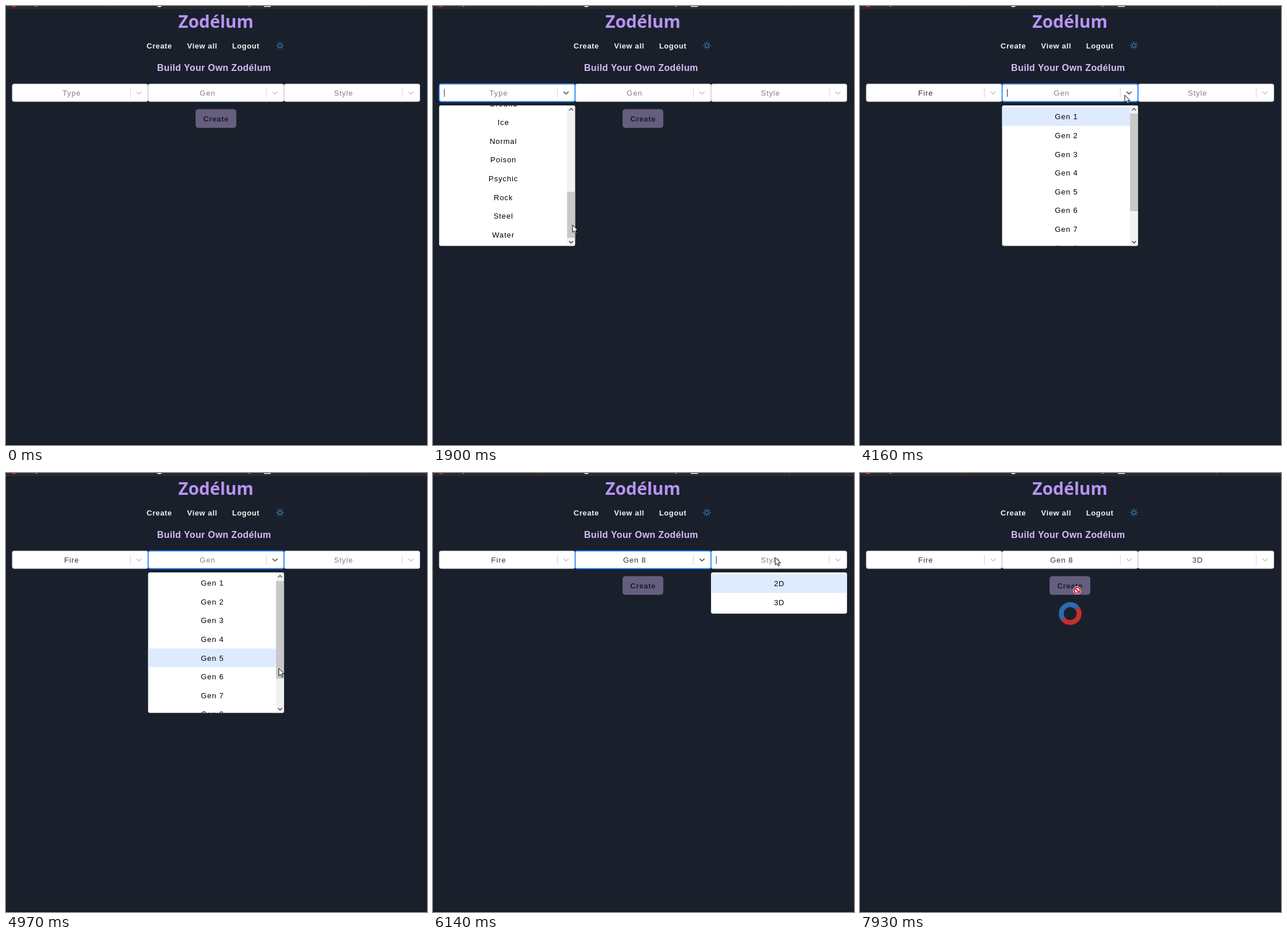
An HTML page with a canvas for the animation above (8000 ms loop, 733 by 764 pixels).

```html
<!DOCTYPE html>
<html lang="en">
<head>
<meta charset="utf-8">
<title>Build Your Own Zodélum</title>
<style>
  html, body { margin: 0; width: 100%; height: 100%; overflow: hidden; background: #1a202b; }
  canvas { display: block; }
</style>
</head>
<body>
<canvas id="stage" width="733" height="764"></canvas>
<script>
const ctx = document.getElementById('stage').getContext('2d');
const LOOP = 8000, STEP = 90;
const SANS = '"Liberation Sans", Arial, sans-serif';
const DARK = '#1a202b', FOCUS = '#2684ff';

// Select and menu metrics
const WIDTH = 236.7, TOP = 135.5, HEIGHT = 31, RADIUS = 3.3;
const MENU_TOP = 173, MENU_MAX = 244.5, PAD = 3.26, ROW = 32.6, BAR = 13.9;

// All times below are counted in steps.
const selects = [
  { x: 10.7, label: 'Type', value: 'Fire', open: 8, pick: 40, focus: [8, 45], caretEnd: 45,
    options: ('Bug Dark Dragon Electric Fairy Fighting Fire Flying Ghost Grass Ground ' +
      'Ice Normal Poison Psychic Rock Steel Water').split(' '),
    thumb: 80, drag: { from: 17, to: 32, y: 228 } },
  { x: 247.4, label: 'Gen', value: 'Gen 8', open: 45, pick: 63, focus: [45, 69], caretEnd: 68,
    options: Array.from({ length: 9 }, (_, i) => `Gen ${i + 1}`),
    thumb: 170, drag: { from: 55, to: 57, y: 339 } },
  { x: 484.1, label: 'Style', value: '3D', open: 68, pick: 73, focus: [69, 81], caretEnd: 81,
    options: ['2D', '3D'] },
];
const HOVER = 78, SUBMIT = 81;

const pointerPath = [                       // step, x, y
  [1, 110, 314], [6, 225, 148], [8, 225, 148], [15, 243, 228], [17, 243, 228],
  [21, 243, 381], [22, 246, 384], [23, 246, 384], [32, 249, 276], [35, 249, 276],
  [37, 130, 264], [40, 130, 264], [45, 461, 155], [48, 461, 155], [52, 456, 255],
  [54, 466, 325], [55, 475, 340], [57, 473, 386], [58, 455, 372], [60, 430, 365],
  [62, 430, 365], [66, 596, 147], [68, 596, 147], [72, 602, 222], [73, 602, 222],
  [77, 368, 168], [78, 370, 195], [79, 372, 207], [81, 373, 206], [83, 378, 204],
];

const clamp = (v, lo, hi) => Math.min(hi, Math.max(lo, v));
const within = (v, a, b) => v >= a && v < b;

function pointerAt(step) {
  const next = pointerPath.findIndex(p => p[0] >= step);
  if (next <= 0) return (next ? pointerPath.at(-1) : pointerPath[0]).slice(1);
  const a = pointerPath[next - 1], b = pointerPath[next];
  const u = (step - a[0]) / (b[0] - a[0]);
  return [1, 2].map(i => a[i] + (b[i] - a[i]) * u);
}

// Share of the scroll range, 0 to 1, taken from the dragged thumb
function scrollShare({ drag, thumb }, step) {
  if (!drag || step < drag.from) return 0;
  const travel = MENU_MAX - 2 * BAR - thumb;
  return clamp((pointerAt(Math.min(step, drag.to))[1] - drag.y) / travel, 0, 1);
}

function menuLayout(sel, step) {
  const full = sel.options.length * ROW + 2 * PAD;
  const height = Math.min(full, MENU_MAX);
  const share = scrollShare(sel, step);
  return { height, share, listWidth: WIDTH - (sel.drag ? BAR : 0), offset: share * (full - height) };
}

// The last option the pointer passed over stays highlighted
function highlighted(sel, step) {
  let row = 0;
  for (let s = sel.open; s <= step; s++) {
    const [x, y] = pointerAt(s), m = menuLayout(sel, s);
    if (within(x, sel.x, sel.x + m.listWidth) && within(y, MENU_TOP + PAD, MENU_TOP + m.height))
      row = clamp(Math.floor((y - MENU_TOP - PAD + m.offset) / ROW), 0, sel.options.length - 1);
  }
  return row;
}

function box(x, y, w, h, fill, radius = 0) {
  ctx.fillStyle = fill;
  ctx.beginPath();
  ctx.roundRect(x, y, w, h, radius);
  ctx.fill();
}

function line(points, color, width, close) {
  ctx.beginPath();
  points.forEach(p => ctx.lineTo(...p));
  if (close) ctx.closePath();
  ctx.strokeStyle = color;
  ctx.lineWidth = width;
  ctx.stroke();
}

function disc(x, y, r, fill) {
  ctx.beginPath();
  ctx.arc(x, y, r, 0, 7);
  ctx.fillStyle = fill;
  ctx.fill();
}

function arc(x, y, r, from, to, color, width) {
  ctx.beginPath();
  ctx.arc(x, y, r, from, to);
  ctx.strokeStyle = color;
  ctx.lineWidth = width;
  ctx.stroke();
}

function text(str, x, y, color, { font = `13.1px ${SANS}`, spacing = 0.9, align = 'center' } = {}) {
  ctx.font = font;
  ctx.letterSpacing = spacing + 'px';
  ctx.textAlign = align;
  ctx.fillStyle = color;
  ctx.fillText(str, x + (align === 'center' ? spacing / 2 : 0), y);
}

const bold = { font: `bold 13px ${SANS}`, spacing: 0.65 };
const chevron = (x, y, w, h, color, width) =>
  line([[x - w, y - h], [x, y + h], [x + w, y - h]], color, width);

function drawPage() {
  box(0, 0, 733, 764, DARK);
  box(0, 762, 733, 2, '#151922');

  // Lower edge of the browser's bookmark bar
  box(0, 0, 733, 6.5, '#2a2b2d');
  box(0, 6, 733, 1, '#17191e');
  disc(14, -4, 6, '#e0284a');
  disc(184, -4, 5, '#c02020');
  disc(267, -4, 6, '#eeeeee');
  box(449, 0, 12, 1.5, '#eeeeee');
  [['g', 53], ['g', 423], ['p', 622]].forEach(([c, x]) =>
    text(c, x, -1, '#c8c8c8', { font: `11px ${SANS}`, spacing: 0 }));

  text('Zodélum', 365.5, 38, '#b794f4',
    { font: 'bold 30px "Open Sans", "Noto Sans", sans-serif', spacing: 0 });
  text('Create', 266.7, 73.5, '#f2f2f2', bold);
  text('View all', 341.3, 73.5, '#f2f2f2', bold);
  text('Logout', 417.3, 73.5, '#f2f2f2', bold);
  text('Build Your Own Zodélum', 263, 112.5, '#d6bcfa',
    { font: `bold 16px ${SANS}`, spacing: 0.4, align: 'left' });

  arc(477, 68.7, 3.2, 0, 7, '#4299e1', 1.1);
  for (let i = 0; i < 8; i++) {
    const c = Math.cos(i * Math.PI / 4), s = Math.sin(i * Math.PI / 4);
    line([[477 + 5 * c, 68.7 + 5 * s], [477 + 6.6 * c, 68.7 + 6.6 * s]], '#4299e1', 1.2);
  }
}

function drawButton(step) {
  const enabled = within(step, selects[2].pick, SUBMIT);
  const fill = !enabled ? '#655e7e' : step >= HOVER ? '#b794f4' : '#d6bcfa';
  box(330, 179.5, 71, 32.6, fill, 5);
  text('Create', 365.3, 200.7, DARK, bold);
}

function drawSelect(sel, step) {
  const { x } = sel, focused = within(step, ...sel.focus), picked = step >= sel.pick;
  box(x, TOP, WIDTH, HEIGHT, '#fff', RADIUS);
  ctx.strokeStyle = focused ? FOCUS : '#cccccc';
  ctx.lineWidth = focused ? 1.8 : 0.8;
  const inset = focused ? 0.1 : 0.4;
  ctx.beginPath();
  ctx.roundRect(x + inset, TOP + inset, WIDTH - 2 * inset, HEIGHT - 2 * inset, RADIUS);
  ctx.stroke();
  text(picked ? sel.value : sel.label, x + 103.2, 155.8, picked ? '#333333' : '#808080');
  box(x + 205.4, 142.4, 0.9, 17, '#cccccc');
  chevron(x + 221, 151.2, 4.3, 2, focused ? '#555555' : '#cccccc', 1.7);
  if (within(step, sel.open, sel.caretEnd) && (step - sel.open) * STEP % 1000 < 500)
    box(x + 8.6, 144.5, 1, 13.5, '#222222');
}

function drawMenu(sel, step) {
  const { x } = sel, m = menuLayout(sel, step), active = highlighted(sel, step);
  box(x, MENU_TOP, WIDTH, m.height, '#fff', RADIUS);
  ctx.save();
  ctx.clip();
  sel.options.forEach((name, i) => {
    const y = MENU_TOP + PAD + i * ROW - m.offset;
    if (i === active) box(x, y, m.listWidth, ROW, '#deebff');
    text(name, x + m.listWidth / 2, y + 21.1, '#000');
  });
  if (sel.drag) {
    const barX = x + m.listWidth, mid = barX + BAR / 2;
    const travel = MENU_MAX - 2 * BAR - sel.thumb;
    box(barX, MENU_TOP, BAR, MENU_MAX, '#f1f1f1');
    box(barX, MENU_TOP + BAR + m.share * travel, BAR, sel.thumb, '#c8c8c8');
    chevron(mid, MENU_TOP + 7, 3.4, -1.7, '#505050', 1.6);
    chevron(mid, MENU_TOP + 237.8, 3.4, 1.7, '#505050', 1.6);
  }
  ctx.restore();
}

function drawSpinner(step) {
  const split = (144 + (step - 88) * STEP * 0.6) * Math.PI / 180;
  arc(366, 244.6, 15.5, split, split + Math.PI, '#2b6cb0', 8.5);
  arc(366, 244.6, 15.5, split + Math.PI, split + 2 * Math.PI, '#c53030', 8.5);
}

const arrow = new Path2D('M0 0V13L3 10.3L5.2 15L7.2 14.1L5.1 9.6H9.2Z');
const hand = new Path2D('M-1 1Q0-.5 1 1V6L7 7.5Q8 8 8 10L7 16H-1L-5 10Q-5 8-3 9L-1 11Z');

function drawPointer(step) {
  const [x, y] = pointerAt(step);
  if (step >= SUBMIT) {
    disc(x, y, 7, '#fff');
    arc(x, y, 5.2, 0, 7, '#c8102e', 2);
    line([[x - 3.7, y - 3.7], [x + 3.7, y + 3.7]], '#c8102e', 2);
    return;
  }
  const shape = step >= HOVER ? hand : arrow;
  ctx.save();
  ctx.translate(x, y);
  ctx.fillStyle = '#fff';
  ctx.strokeStyle = '#000';
  ctx.lineWidth = 1;
  ctx.fill(shape);
  ctx.stroke(shape);
  ctx.restore();
}

function draw(now) {
  const step = Math.floor((now % LOOP - 10) / STEP);
  drawPage();
  drawButton(step);
  const isFocused = s => within(step, ...s.focus);
  [...selects].sort((a, b) => isFocused(a) - isFocused(b)).forEach(s => drawSelect(s, step));
  selects.filter(s => within(step, s.open, s.pick)).forEach(s => drawMenu(s, step));
  if (step >= SUBMIT) drawSpinner(step);
  if (step >= 1) drawPointer(step);
}

const start = performance.now();
(function tick() {
  draw(performance.now() - start);
  requestAnimationFrame(tick);
})();
</script>
</body>
</html>
```
